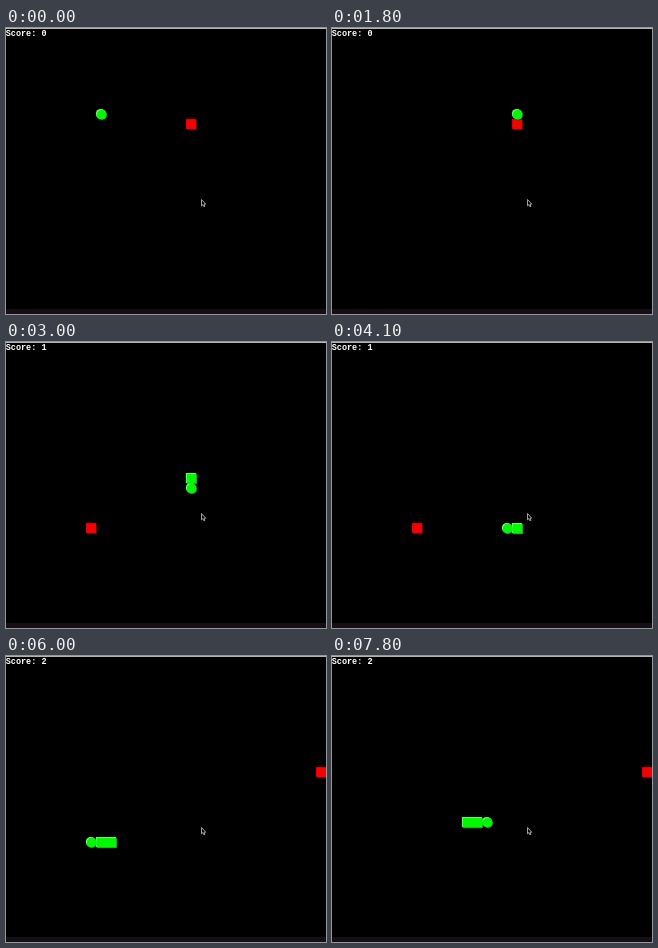
Write an HTML page that moves like this. It is 320 px wide and 286 px high and loops after 8 s.

```html
<!DOCTYPE html>
<html lang="en">
<head>
<meta charset="utf-8">
<title>Snake</title>
<style>
  html, body { margin: 0; width: 100%; height: 100%; overflow: hidden; background: #000; }
  svg { display: block; width: 320px; height: 286px; }
  text { font: bold 8.5px "Liberation Mono", monospace; fill: #fff; white-space: pre; }
</style>
</head>
<body>
<svg viewBox="0 0 320 286">
  <defs><path id="snake"/></defs>
  <rect width="320" height="286"/>
  <rect width="320" height="1" fill="#b4b4b4"/>
  <rect y="281" width="320" height="5" fill="#150e13"/>
  <text id="score" x="-.3" y="8"></text>

  <g id="food">
    <rect x="1.5" y="1.5" width="10" height="10" fill="#4a0000"/>
    <rect width="10" height="10" fill="#c40808"/>
    <rect x=".9" y=".9" width="9.4" height="9.4" fill="#f80000"/>
  </g>

  <use href="#snake" x="1.5" y="1.5" fill="#003c00"/>
  <use href="#snake" x="-.1" y="-.1" fill="#b0dcb0"/>
  <use href="#snake" x=".7" y=".8" fill="#00f800"/>

  <path d="M195.5 171.5v6.3l1.4-1.2 1 2.2 1-.5-.9-2.1h1.7z" fill="#000" stroke="#c8c8c8" stroke-width=".8"/>
</svg>
<script>
  const LOOP = 8000, CELL = 10;
  const snake = document.getElementById('snake');
  const food = document.getElementById('food');
  const score = document.getElementById('score');

  const turns = [[9, 1, 0], [10, 0, 1], [10, -1, 0], [2, 0, -1], [7, 1, 0]];
  const meals = [10, 29];
  const foods = [[180, 91], [80, 181], [310, 111]];
  const lateSteps = [8, 20, 27];

  const trail = [[90, 81]];
  for (const [count, dx, dy] of turns) {
    for (let i = 0; i < count; i++) {
      const [x, y] = trail[trail.length - 1];
      trail.push([x + dx * CELL, y + dy * CELL]);
    }
  }

  // Steps come every 200 ms; a few lag by one 100 ms tick.
  const stepTime = k => k * 200 - 100 + 100 * lateSteps.filter(s => k >= s).length;

  const square = ([x, y]) => `M${x} ${y}h10v10h-10z`;
  const disc = ([x, y]) => `M${x} ${y + 5}a5 5 0 1 1 10 0a5 5 0 1 1 -10 0z`;

  function draw(step) {
    const points = meals.filter(m => step >= m).length;
    const body = trail.slice(Math.max(0, step - points), step);
    snake.setAttribute('d', body.map(square).join('') + disc(trail[step]));
    food.setAttribute('transform', `translate(${foods[points]})`);
    score.textContent = `Score: ${points}`;
  }

  let shown = -1;
  function tick() {
    const time = performance.now() % LOOP;
    let step = 0;
    while (step < trail.length - 1 && stepTime(step + 1) <= time) step++;
    if (step !== shown) draw(shown = step);
    requestAnimationFrame(tick);
  }
  tick();
</script>
</body>
</html>
```
